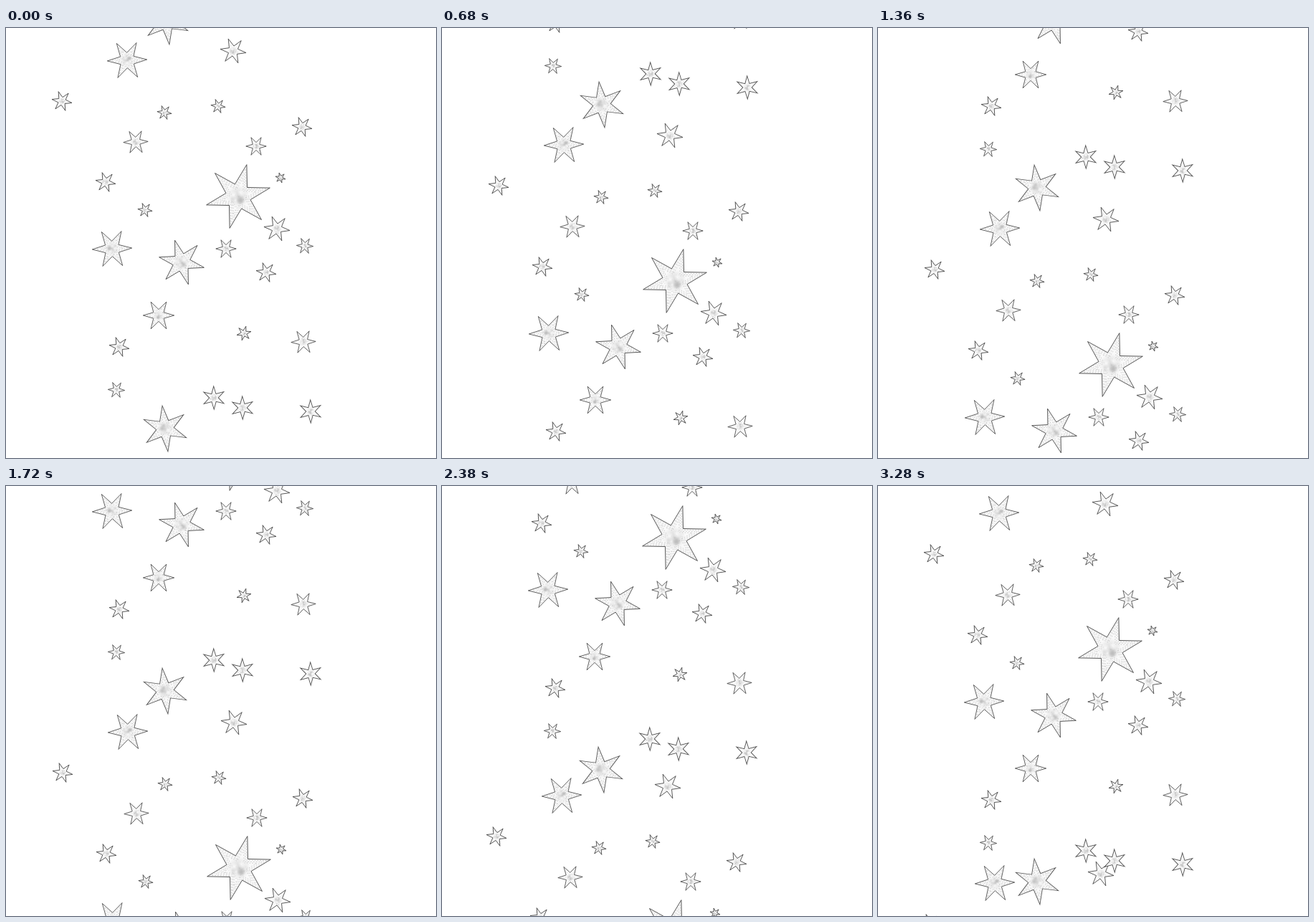
Recreate the animation shown at these times as an HTML page with a canvas. Size 600 by 600 pixels, loop 3.34 s.

```html
<!DOCTYPE html>
<html lang="en">
<head>
<meta charset="utf-8">
<title>Falling silver stars</title>
<style>
html, body { margin: 0; width: 100%; height: 100%; overflow: hidden; background: #fff; }
canvas { display: block; }
</style>
</head>
<body>
<canvas id="stage" width="600" height="600"></canvas>
<script>
const SIZE = 600, LOOP = 3340, SPEED = 6.92, STRIP = 571;
const INNER = 0.385;

let seed = 7;
const rand = () => (seed = seed * 16807 % 2147483647) / 2147483647;

const strip = document.createElement('canvas');
strip.width = strip.height = SIZE;
const pen = strip.getContext('2d');

function starPath(r) {
  const path = new Path2D();
  for (let i = 0; i < 12; i++) {
    const a = i * Math.PI / 6, d = i % 2 ? r * INNER : r;
    path.lineTo(d * Math.cos(a), d * Math.sin(a));
  }
  path.closePath();
  return path;
}

// Soft round patch of grey or white
function blob(x, y, r, tone, alpha) {
  const glow = pen.createRadialGradient(x, y, 0, x, y, r);
  glow.addColorStop(0, `rgba(${tone},${tone},${tone},${alpha})`);
  glow.addColorStop(1, `rgba(${tone},${tone},${tone},0)`);
  pen.fillStyle = glow;
  pen.fillRect(x - r, y - r, 2 * r, 2 * r);
}

function texture(r) {
  for (let i = 0; i < r * 2.2; i++) {
    const a = rand() * 2 * Math.PI, d = r * rand() * 0.8;
    pen.fillStyle = `rgba(130,130,130,${0.1 + rand() * 0.25})`;
    pen.fillRect(d * Math.cos(a), d * Math.sin(a), 1.2, 1);
  }
  if (r > 20) {
    pen.setLineDash([1.6, 2.2]);
    pen.strokeStyle = 'rgba(150,150,150,.45)';
    for (let d = r - 6; d > r * 0.5; d -= 7) pen.stroke(starPath(d));
    pen.setLineDash([]);
  }
  blob(0, 0, r * 0.34, 195, 0.7);
  for (let i = 0; i < 6; i++) {
    const a = rand() * 2 * Math.PI;
    blob(r * 0.14 * Math.cos(a), r * 0.14 * Math.sin(a), r * 0.13, i % 2 ? 255 : 185, 0.8);
  }
}

function drawStar(x, y, r, turn) {
  const edge = starPath(r);
  pen.save();
  pen.translate(x, y);
  pen.rotate(turn * Math.PI / 180);
  pen.lineWidth = 0.9;
  pen.fillStyle = '#f9f9f9';
  pen.fill(edge);
  pen.save();
  pen.clip(edge);
  texture(r);
  pen.restore();
  pen.strokeStyle = 'rgba(60,60,60,.88)';
  pen.stroke(edge);
  pen.restore();
}

// Stars of one size and tilt
function group(r, turn, ...spots) {
  for (const [x, y] of spots) drawStar(x, y, r - 0.8, turn);
}

group(46.7, -15, [324, 235]);
group(33, 13, [245, 327]);
group(33, 23, [222, 559]);
group(28.5, -2, [169, 45], [148, 308]);
group(22.5, 0, [213, 401]);
group(19, 8, [317, 32], [378, 280]);
group(18, -2, [181, 159], [415, 438]);
group(17, 29, [290, 516], [330, 530], [425, 535]);
group(15, 0, [349, 165], [307, 308]);
group(15, 10, [78, 102], [139, 215], [158, 445], [363, 341], [413, 138]);
group(12.5, 3, [154, 505], [417, 304]);
group(11, 8, [221, 118], [296, 109], [194, 254]);
group(11, -14, [332, 426]);
group(8, 15, [383, 209]);

// Hard steps: one beat every 40 ms, then one and a half every 60 ms
function beatAt(ms) {
  return ms < 2020
    ? Math.min(49, Math.floor(ms / 40))
    : 50 + 1.5 * Math.floor((ms - 2020) / 60);
}

const view = document.getElementById('stage').getContext('2d');
const place = (x, y) => view.drawImage(strip, Math.round(x), Math.round(y));

function draw(now) {
  const beat = beatAt(now % LOOP), fall = SPEED * beat;
  const late = Math.max(0, beat - 44.5);   // lower strip lags and drifts left
  const lead = Math.max(0, 1 - beat / 34); // upper strip settles into place
  view.clearRect(0, 0, SIZE, SIZE);
  place(0.03 * beat - 0.235 * late, fall - 1.49 * late);
  place(2.2 * lead, fall - STRIP + 2.5 * lead);
  requestAnimationFrame(draw);
}
draw(performance.now());
</script>
</body>
</html>
```
